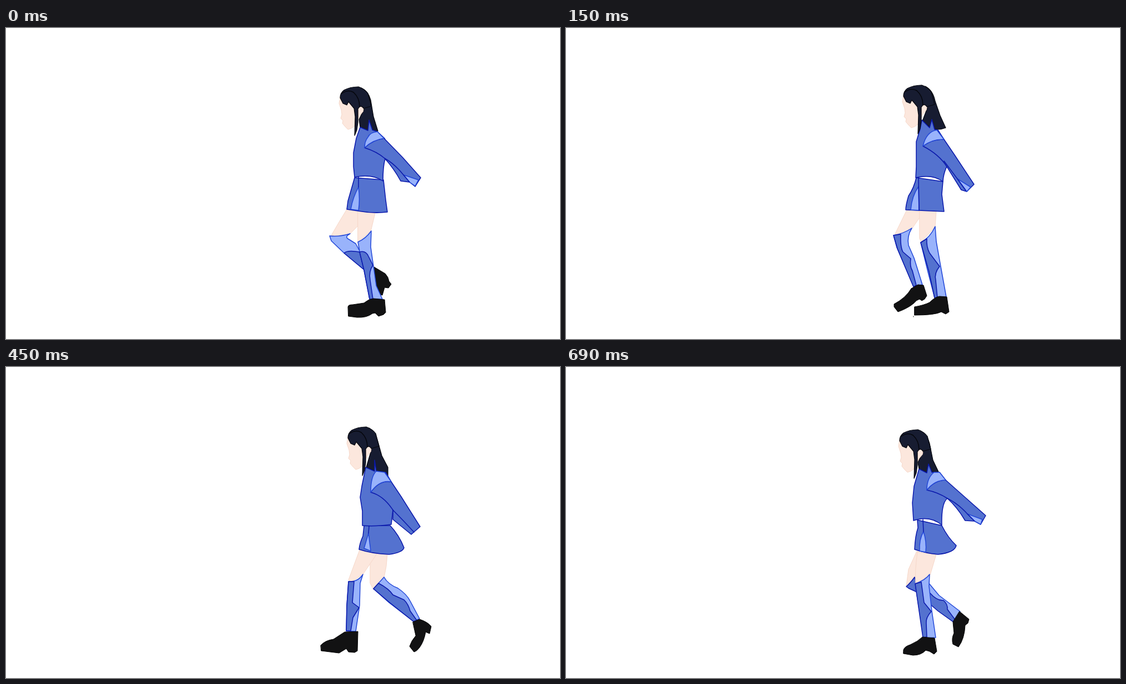
These frames come from a looping animation (998x561 px, 0.75 s). An HTML page:

```html
<!DOCTYPE html>
<html lang="en">
<head>
<meta charset="utf-8">
<title>Walk cycle</title>
<style>
  html, body { margin: 0; width: 100%; height: 100%; overflow: hidden; background: #fff; }
  svg { display: block; width: 998px; height: 561px; }
  path { stroke-width: 1.5; stroke-linejoin: round; stroke-linecap: round; }
  .blue { fill: #5472cf; stroke: #0a18ac; }
  .light { fill: #99b3fb; stroke: #2348d8; }
  .skin { fill: #fce7dd; stroke: #f6d8ca; stroke-width: 1; }
  .shoe { fill: #121213; stroke: #050505; stroke-width: 1; }
  .hair { fill: #171c31; stroke: #05060c; stroke-width: 1.2; }
  .line { fill: none; stroke: #0a18ac; }
  .band { fill: none; stroke: #04050a; }
  .pose { visibility: hidden; animation: show 750ms step-end infinite; animation-delay: calc(var(--step) * 150ms - 750ms); }
  @keyframes show {
    0% { visibility: visible; }
    20%, 100% { visibility: hidden; }
  }
</style>
</head>
<body>
<svg viewBox="0 0 998 561">
  <defs>
    <g id="head">
      <path class="skin" d="M602 124L600 136 604 148 605 156 603 163 607 167 606 172 611 178 616 183 622 181 629 176 632 160 632 138 618 124Z"/>
      <path class="skin" d="M634 146Q637 140 642 142 645 145 643 151L637 158 634 164Z"/>
      <path class="hair" d="M602 126Q602 117 609 112 620 106 635 106 646 110 652 118L658 141 644 145Q641 140 637 142L634 146 634 170 632 184 628 194 629 160 627 145 617 133 614 139 607 136Z"/>
      <path class="band" d="M605 118Q616 110 626 116 637 126 637 142"/>
    </g>
  </defs>

  <g class="pose" style="--step:0">
    <path class="hair" d="M640 108Q653 114 657 130L662 160 670 186 652 185 638 179 636 165 645 146Z"/>
    <path class="shoe" d="M663 431L683 443Q689 449 690 457L694 462 689 469 682 468 678 482 670 480 664 455Z"/>
    <path class="skin" d="M614 327L600 350 586 374 604 377 619 372 634 357 636 328Z"/>
    <path class="light" d="M583 375Q600 377 620 371 608 377 619 382L630 389 637 402 645 436 609 406 586 384Z"/>
    <path class="blue" d="M609 406Q615 400 637 404L645 436Z"/>
    <path class="skin" d="M634 330L665 334 657 367 634 386Z"/>
    <path class="light" d="M634 386Q648 380 658 366L657 395 662 430 667 465 678 489 655 489 645 437 637 403Z"/>
    <path class="blue" d="M637 404Q648 401 653 412L661 428Q653 439 656 455L661 489 655 489 645 437Z"/>
    <path class="shoe" d="M616 503Q616 499 625 499L645 496Q653 489 662 488L682 490 684 513 680 517 671 520 665 514 660 515Q650 523 632 522L617 520Z"/>
    <path class="blue" d="M628 270L680 274 684 310 687 332Q662 335 634 330L614 327 616 312Z"/>
    <path class="light" d="M635 287Q625 305 621 327L635 329Q638 310 635 287Z"/>
    <path class="line" d="M635 268V287"/>
    <path class="blue" d="M638 179L652 185 654 166 660 184 669 187 682 199 692 225 683 236Q679 250 679 276 660 263 628 269L626 250 626 225 631 199Z"/>
    <path class="blue" d="M646 216Q660 202 681 199L715 234 747 270 737 286 727 278 711 276Q698 252 682 235 668 223 646 216Z"/>
    <path class="light" d="M716 265L743 274 737 285 727 278Z"/>
    <path class="line" d="M682 235Q700 245 716 265L727 278"/>
    <path class="light" d="M646 216Q646 204 652 197 656 188 669 187L681 199Q660 202 646 216Z"/>
    <use href="#head"/>
  </g>

  <g class="pose" style="--step:1">
    <path class="hair" d="M647 105Q661 112 665 132L674 158 684 180Q672 185 658 181L642 168 651 144Z"/>
    <path class="skin" d="M613 330L592 373Q610 370 624 361L637 342V331Z"/>
    <path class="light" d="M590 374Q608 371 623 361 614 375 617 392L627 415 642 463 626 466 596 396Z"/>
    <path class="blue" d="M590 374L603 372Q602 395 607 404L621 416Q619 430 624 438L631 464 626 467 597 398Z"/>
    <path class="shoe" d="M622 470L634 463 644 464 650 483 646 489 641 492 637 489Q632 490 626 497 615 506 598 512L591 503V498Q612 487 622 470Z"/>
    <path class="skin" d="M637 331H667L665 359 640 386 637 380Z"/>
    <path class="light" d="M639 387Q656 378 665 358L667 385 675 430 685 485 664 486 652 440Z"/>
    <path class="blue" d="M639 387L650 380Q649 395 655 406L673 430Q663 442 666 455L669 486 664 487 654 440Z"/>
    <path class="shoe" d="M628 503Q645 500 655 495 665 485 673 484L686 485 690 512 684 516 676 512Q665 518 628 518Z"/>
    <path class="shoe" d="M626 520V521"/>
    <path class="blue" d="M631 270L679 277 677 300 681 331 612 328Q612 320 617 303 627 288 631 270Z"/>
    <path class="light" d="M635 286Q623 303 621 328L636 329Z"/>
    <path class="line" d="M635 268L636 329"/>
    <path class="blue" d="M641 166L655 180 659 165 664 183 670 184 681 201 690 230 686 250Q680 262 679 277 660 263 630 270L631 250 631 205 638 182Z"/>
    <path class="blue" d="M643 213Q660 200 681 201L700 229 735 282 722 295 712 292 686 250Q672 228 643 213Z"/>
    <path class="light" d="M705 272L729 287 722 295Z"/>
    <path class="line" d="M681 240L705 272 720 293"/>
    <path class="light" d="M643 213Q649 187 668 184L681 201Q660 200 643 213Z"/>
    <use href="#head" x="6" y="-3"/>
  </g>

  <g class="pose" style="--step:2">
    <path class="hair" d="M660 101Q672 107 677 125L689 160 693 176 690 181 675 179 654 171 663 140Z"/>
    <path class="skin" d="M618 319L592 377 625 366 646 340 650 321Z"/>
    <path class="blue" d="M592 377Q607 373 625 366L599 409 562 462 544 455Z"/>
    <path class="light" d="M598 408L582 412Q572 428 550 453L562 461Z"/>
    <path class="shoe" d="M493 463L499 453 507 450Q520 458 540 456L546 452 561 461 555 478 545 492 534 491 527 483Q515 473 497 467Z"/>
    <path class="skin" d="M645 321L676 329 678 367Q668 385 658 389 648 370 645 340Z"/>
    <path class="blue" d="M659 389Q672 380 677 367L682 395 698 435 711 482 688 486 674 430Z"/>
    <path class="light" d="M667 383L677 367 682 393 699 433 682 418Q678 398 667 383Z"/>
    <path class="light" d="M700 437L711 482 696 485 694 448Z"/>
    <path class="shoe" d="M656 506L660 501Q676 500 684 488L714 483 719 506 714 510 707 511 698 506Q690 517 660 521Z"/>
    <path class="blue" d="M686 185Q692 200 690 220L711 293 709 298 694 307 675 240Z"/>
    <path class="light" d="M693 272Q700 283 711 293L709 298 695 307Z"/>
    <path class="blue" d="M639 261L660 256 682 290 682 312 678 330Q663 322 648 321L612 315 616 302Z"/>
    <path class="light" d="M640 276Q630 284 618 316L632 318Z"/>
    <path class="line" d="M643 261Q636 290 632 318"/>
    <path class="blue" d="M656 172L669 177 672 161 677 177 688 183 690 215 675 256Q655 256 639 261L638 210 645 188Z"/>
    <path class="blue" d="M654 230Q660 205 672 206 684 212 686 235L694 275V307L682 314 665 270Z"/>
    <path class="light" d="M664 270L690 292 694 307 682 314Z"/>
    <path class="light" d="M654 230Q644 212 645 197 652 184 668 185 686 192 687 232 684 210 672 206 660 205 654 230Z"/>
    <use href="#head" x="19" y="-7"/>
  </g>

  <g class="pose" style="--step:3">
    <path class="hair" d="M654 110Q666 117 670 135L677 160 688 181V196L668 189 649 181 658 150Z"/>
    <path class="skin" d="M656 352L662 337H687Q686 360 681 380L662 402 656 390Z"/>
    <path class="light" d="M662 400L681 379Q688 392 706 399 722 410 728 422L745 454 734 459 690 425Z"/>
    <path class="blue" d="M662 400L671 390Q690 400 697 411L717 420Q725 428 728 440L740 457 734 459 690 424Z"/>
    <path class="shoe" d="M733 460L745 455Q760 460 766 468L763 481 756 478Q753 495 745 506 740 513 735 514L727 504Q730 494 738 485Z"/>
    <path class="skin" d="M637 330L617 384 622 388 643 374 668 337Z"/>
    <path class="light" d="M617 387Q634 388 643 374L638 390 637 430 630 477 613 476 614 430Z"/>
    <path class="blue" d="M617 387H627L624 425 636 434 625 452 621 476 613 476 614 430Z"/>
    <path class="shoe" d="M567 502Q575 493 590 491L610 478 634 477 633 512 628 515 617 514 613 508 600 516 568 512Z"/>
    <path class="blue" d="M645 286H692Q708 303 717 326 714 335 690 338 660 337 636 329 637 318 643 305Z"/>
    <path class="light" d="M653 300L645 327 657 332Z"/>
    <path class="line" d="M654 287L653 300"/>
    <path class="blue" d="M648 181L664 188 664 168 667 188 684 190 694 207 705 250 697 258 694 284Q665 288 642 286V260L638 235 641 215Z"/>
    <path class="blue" d="M657 226Q673 203 694 207L712 234 746 288 730 302 697 275V258Q680 232 657 226Z"/>
    <path class="line" d="M697 258Q715 276 735 298"/>
    <path class="light" d="M657 226Q657 197 667 188L682 190 694 207Q673 203 657 226Z"/>
    <use href="#head" x="14" y="2"/>
  </g>

  <g class="pose" style="--step:4">
    <path class="hair" d="M638 115Q651 122 655 138L661 168 671 189 651 191 636 184 634 172 643 153Z"/>
    <path class="skin" d="M632 332L617 365 613 395 632 385 640 336Z"/>
    <path class="light" d="M652 388L672 412 710 441 698 460 672 441 657 425Z"/>
    <path class="blue" d="M655 407Q668 422 680 421 688 428 687 437L701 456 698 460 670 440 656 428Z"/>
    <path class="blue" d="M613 396Q620 390 628 379L636 404 630 405 617 399Z"/>
    <path class="shoe" d="M709 441L726 455 724 462 719 466Q718 490 707 505L697 500Q694 490 699 480L697 460Z"/>
    <path class="skin" d="M633 334L667 338 656 375 630 391Q628 370 633 334Z"/>
    <path class="light" d="M629 391Q648 384 655 374L654 395 659 440 666 488 644 489Z"/>
    <path class="blue" d="M629 391L640 388 645 425 658 441Q648 452 649 462L650 487 643 488Z"/>
    <path class="shoe" d="M608 510Q610 504 620 501 634 495 642 487L664 489 668 513 663 518 655 513 648 511Q640 520 625 520L608 517Z"/>
    <path class="blue" d="M633 276L677 286Q688 308 703 322 700 335 670 338 648 336 628 329 629 305 634 290Z"/>
    <path class="light" d="M644 297Q636 310 637 332L648 334Q650 315 644 297Z"/>
    <path class="line" d="M643 275L644 297"/>
    <path class="blue" d="M636 184L650 191 653 175 659 190 673 190 684 204 697 228 687 237Q676 245 677 285 655 267 626 277L624 245 627 215Z"/>
    <path class="blue" d="M650 222Q664 204 684 204L720 236 756 268 747 284 736 278 719 277Q705 253 687 237 670 226 650 222Z"/>
    <path class="light" d="M723 265L750 275 747 284 736 278Z"/>
    <path class="line" d="M687 237Q707 247 723 265L736 278"/>
    <path class="light" d="M650 222Q650 200 663 190H673L684 204Q664 204 650 222Z"/>
    <use href="#head" x="-1" y="7"/>
  </g>
</svg>
</body>
</html>
```
